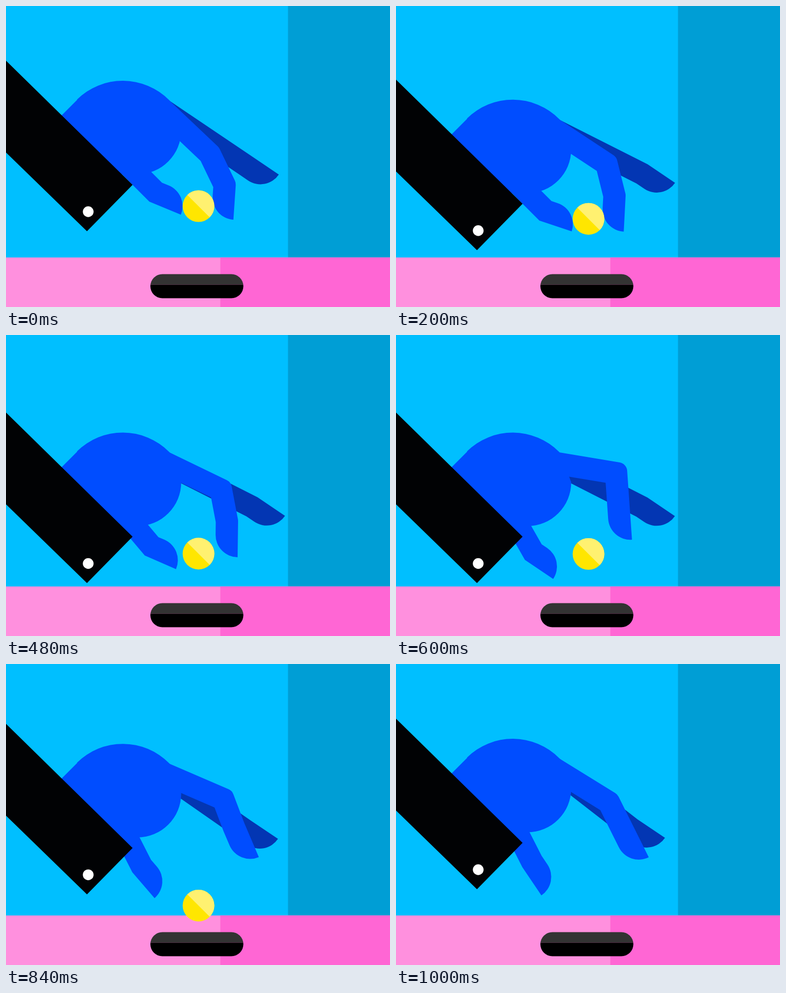
Recreate the animation shown at these times as an HTML page with a canvas. Size 766x600 px, loop 1.24 s.

```html
<!DOCTYPE html>
<html>
<head>
<meta charset="utf-8">
<style>
html, body { margin: 0; width: 100%; height: 100%; overflow: hidden; background: #00bfff; }
canvas { display: block; }
</style>
</head>
<body>
<canvas id="stage" width="766" height="600"></canvas>
<script>
const ctx = document.getElementById('stage').getContext('2d');
const LOOP = 1240, STEP = 40, LAST = 1000;
const SKIN = '#004dff', SHADE = '#0336b3', SLEEVE = '#010204';

// Joint angles in degrees; mid is the length of the index finger's middle bone
const pinch = { base: 43.4, bend: 64.3, tip: 93.9, mid: 78, back: 34, spread: 0, thumb: 22.4 };
const flex = { base: 33.4, bend: 76, tip: 93, mid: 77, back: 26.8, spread: 0, thumb: 18.5 };
const open = { base: 9.5, bend: 86, tip: 86, mid: 78, back: 27, spread: 0.85, thumb: 34 };
const lift = { base: 10.5, bend: 78, tip: 72, mid: 73, back: 30.3, spread: 1, thumb: 39 };
const rest = { base: 31.7, bend: 63.5, tip: 63.5, mid: 66, back: 37.8, spread: 1, thumb: 56 };

const rad = deg => deg * Math.PI / 180;
const mix = (a, b, u) => a + (b - a) * u;
const phase = (t, from, to) => Math.min(Math.max((t - from) / (to - from), 0), 1);
const easeOut = (u, power) => 1 - (1 - u) ** power;
const easeInOut = (u, power) => u < 0.5 ? (2 * u) ** power / 2 : 1 - (2 - 2 * u) ** power / 2;

function blend(a, b, u) {
  return Object.fromEntries(Object.keys(a).map(key => [key, mix(a[key], b[key], u)]));
}

function poseAt(t) {
  if (t < 400) return blend(pinch, flex, easeOut(phase(t, 0, 220), 3));
  if (t < 600) return blend(flex, open, easeInOut(phase(t, 400, 600), 2));
  if (t < 760) return blend(open, lift, phase(t, 600, 760) ** 2);
  return blend(lift, rest, easeOut(phase(t, 760, LAST), 2.3));
}

function armShift(t) {
  return 45.5 * (easeOut(phase(t, 0, 560), 4) - easeInOut(phase(t, 600, LAST), 3.6));
}

function coinHeight(t) {
  const fall = phase(t, 600, LAST);
  return 399 + 37.5 * easeOut(phase(t, 0, 640), 3) + 116 * fall ** 2 + 70 * fall ** 6;
}

// Chain of [length, angle] bones from a starting point
function chain(start, ...bones) {
  const points = [start];
  for (const [length, angle] of bones) {
    const [x, y] = points[points.length - 1];
    points.push([x + length * Math.cos(rad(angle)), y + length * Math.sin(rad(angle))]);
  }
  return points;
}

function rect(color, x, y, w, h) {
  ctx.fillStyle = color;
  ctx.fillRect(x, y, w, h);
}

function disc(color, x, y, r, from = 0, to = 360) {
  ctx.fillStyle = color;
  ctx.beginPath();
  ctx.arc(x, y, r, rad(from), rad(to));
  ctx.fill();
}

// A band of constant width on one side of a polyline, ending in a quarter round
function limb(color, pts, side, width, radius = 0) {
  const end = pts.length - 1;
  const angles = pts.slice(1).map((p, i) => Math.atan2(p[1] - pts[i][1], p[0] - pts[i][0]));
  const tip = angles[end - 1], [tx, ty] = pts[end];
  ctx.fillStyle = color;
  ctx.beginPath();
  ctx.moveTo(...pts[0]);
  for (let i = 1; i < end; i++) ctx.arcTo(...pts[i], ...pts[i + 1], radius);
  ctx.lineTo(tx, ty);
  ctx.arc(tx - width * Math.cos(tip), ty - width * Math.sin(tip), width,
    tip, tip + side * Math.PI / 2, side < 0);
  for (let i = end - 1; i >= 0; i--) {
    const before = angles[Math.max(i - 1, 0)], after = angles[i];
    const normal = (before + after) / 2 + side * Math.PI / 2;
    const miter = width / Math.cos((after - before) / 2);
    ctx.lineTo(pts[i][0] + miter * Math.cos(normal), pts[i][1] + miter * Math.sin(normal));
  }
  ctx.fill();
}

function palm() {
  ctx.fillStyle = SKIN;
  ctx.beginPath();
  ctx.moveTo(110, 219);
  ctx.lineTo(142, 187);
  ctx.arc(233, 279, 130, rad(-134.7), rad(-43.2));
  ctx.arc(262, 248, 87.5, 0, rad(90));
  ctx.lineTo(225, 335.5);
  ctx.fill();
}

function sleeve() {
  ctx.fillStyle = SLEEVE;
  ctx.beginPath();
  ctx.moveTo(-20, 89.4);
  ctx.lineTo(252.5, 356.5);
  ctx.lineTo(161.5, 449);
  ctx.lineTo(-20, 272.5);
  ctx.fill();
  disc('#fff', 164, 410, 10.7);
}

function arm(pose, shift) {
  const knuckle = [mix(286, 252, pose.spread), mix(390, 405, pose.spread)];
  const thumbBase = chain(knuckle, [-110, mix(45, 63, pose.spread)])[1];
  ctx.save();
  ctx.translate(0, shift);
  limb(SHADE, chain([327, 189.5], [196, pose.back], [66, 34]), 1, 44);
  limb(SKIN, [thumbBase, ...chain(knuckle, [68, pose.thumb])], -1, 44.5);
  palm();
  limb(SKIN, chain([326, 188.5], [136, pose.base], [pose.mid, pose.bend], [74, pose.tip]), 1, 44.5, 18);
  sleeve();
  ctx.restore();
}

function scene() {
  rect('#00bfff', 0, 0, 766, 600);
  rect('#009ed5', 562.5, 0, 204, 501);
  rect('#ff90de', 0, 501.3, 766, 99);
  rect('#ff66d4', 427.5, 501.3, 339, 99);
  ctx.save();
  ctx.beginPath();
  ctx.roundRect(288, 534.5, 185.5, 48, 24);
  ctx.clip();
  rect('#333', 280, 530, 200, 25.5);
  rect('#000', 280, 555.5, 200, 30);
  ctx.restore();
}

// The lower lip of the slot hides the coin as it drops in
function coin(y) {
  ctx.save();
  ctx.beginPath();
  ctx.rect(0, 0, 766, 582.5);
  ctx.clip();
  disc('#ffe600', 384, y, 31.6);
  disc('#fff170', 384, y, 31.6, -135, 45);
  ctx.restore();
}

const start = performance.now();
function draw() {
  const elapsed = (performance.now() - start) % LOOP;
  const t = Math.min(Math.floor(elapsed / STEP) * STEP, LAST);
  scene();
  arm(poseAt(t), armShift(t));
  coin(coinHeight(t));
  requestAnimationFrame(draw);
}
draw();
</script>
</body>
</html>
```
